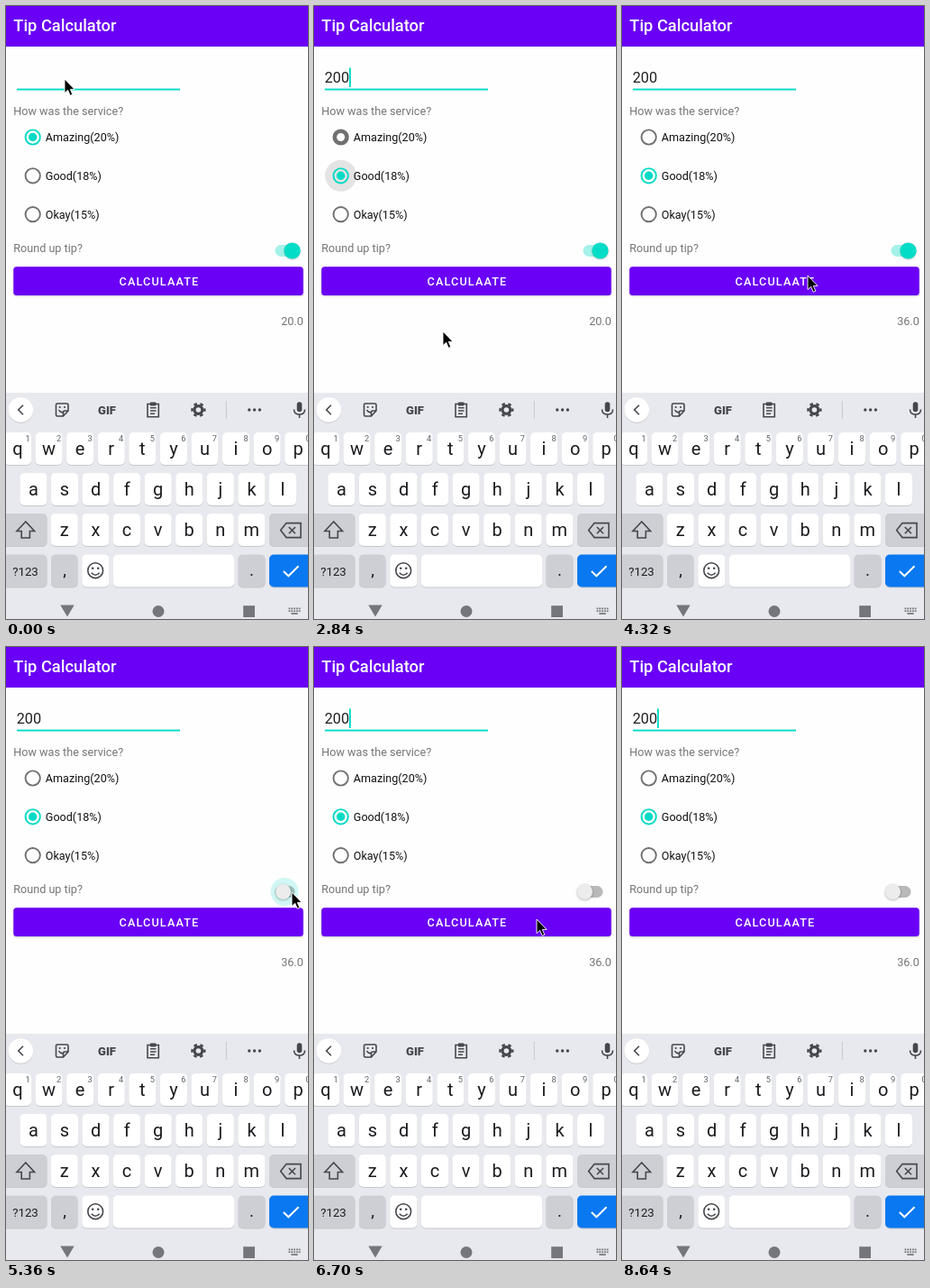
These frames come from a looping animation (335x680 px, 8.78 s). An HTML page:

```html
<!DOCTYPE html>
<html lang="en">
<head>
<meta charset="utf-8">
<title>Tip Calculator</title>
<style>
html, body { margin: 0; width: 100%; height: 100%; overflow: hidden; background: #fefefe; }
svg { display: block; font-family: Roboto, "Noto Sans", sans-serif; }
</style>
</head>
<body>
<svg id="stage" width="335" height="680" viewBox="0 0 335 680">
  <defs>
    <radialGradient id="glow" gradientUnits="userSpaceOnUse" cx="0" cy="0" r="150">
      <stop offset="0" stop-color="#fff" stop-opacity=".21"/>
      <stop offset=".6" stop-color="#fff" stop-opacity=".19"/>
      <stop offset="1" stop-color="#fff" stop-opacity="0"/>
    </radialGradient>
    <filter id="soft" x="-20%" y="-50%" width="140%" height="200%"><feGaussianBlur stdDeviation="1.3"/></filter>
  </defs>
  <rect width="335" height="680" fill="#fefefe"/>
  <rect width="335" height="45" fill="#6a00f6"/>
  <text x="8.3" y="27.6" font-size="18.3" font-weight="500" fill="#fff">Tip Calculator</text>

  <text id="amount" x="11.7" y="85.3" font-size="16.3" fill="#212121"></text>
  <rect x="12" y="91.6" width="181" height="1.9" fill="#03dac5"/>
  <rect id="caret" y="68.5" width="1.9" height="21.5" fill="#03dac5"/>

  <g font-size="12.65" fill="#757575">
    <text x="8.2" y="120.5">How was the service?</text>
    <text x="8.2" y="273">Round up tip?</text>
    <text id="result" x="329.8" y="354.3" text-anchor="end"></text>
  </g>
  <circle id="radioRipple" cx="29.7" cy="188.3" r="17.5"/>
  <g id="radios" font-size="12.6" fill="#111"></g>

  <rect id="track" x="298.5" y="265" width="22" height="13" rx="6.5"/>
  <circle id="halo" cy="271.5" r="15.5" fill="#03dac5"/>
  <circle id="thumbShadow" cy="272.3" r="9" fill="#000" opacity=".22" filter="url(#soft)"/>
  <circle id="thumb" cy="271.5" r="8.9"/>

  <rect id="buttonShadow" x="8.5" y="290.5" width="321" height="31" rx="3.5" fill="#000" filter="url(#soft)"/>
  <rect x="8.3" y="289.2" width="321.4" height="31.8" rx="3.5" fill="#6a00f6"/>
  <rect id="buttonRipple" x="8.3" y="289.2" width="321.4" height="31.8" rx="3.5" fill="url(#glow)"/>
  <text x="125.6" y="310" font-size="12.65" font-weight="500" letter-spacing="1.13" fill="#fff">CALCULAATE</text>

  <g id="keyboard"></g>
  <path id="pointer" d="M0 0V15.6L3.6 12.3L6.2 18.3L8.8 17.2L6.3 11.4H11Z" fill="#000" stroke="#fff" stroke-width=".9"/>
</svg>
<script>
const $ = id => document.getElementById(id);
const set = (id, attrs) => { for (const name in attrs) $(id).setAttribute(name, attrs[name]); };
const LOOP = 8780, STEPS = 59, STEP = LOOP / STEPS;
const TEAL = '#03dac5', GREY = '#707070';

// Pointer positions: [step, x, y]; each holds until the next.
const POINTER = [
  [0, 65, 81], [7, 118, 235], [8, 142, 322.5],
  [10, 122, 296], [11, 78, 230], [12, 52, 187], [13, 41, 186], [14, 33, 187], [15, 29, 188],
  [18, 78, 258], [19, 143, 361], [20, 151, 350], [21, 160, 331], [22, 167, 313], [23, 169, 307],
  [28, 176, 306], [29, 206, 299], [30, 252, 287], [31, 292, 277], [32, 314, 272], [33, 320, 271],
  [36, 317, 272], [37, 316, 273], [38, 300, 280], [39, 270, 295], [40, 247, 302],
  [47, 245, 299], [51, 248, 325], [52, 260, 392], [53, 278, 480], [54, 294, 572], [55, 306, 655], [56, 320, 720]
];

function drawRadios() {
  $('radios').innerHTML = ['Amazing(20%)', 'Good(18%)', 'Okay(15%)'].map((label, i) => {
    const y = 145.5 + i * 42.8;
    return `<circle id="ring${i}" cx="29.7" cy="${y}" fill="none"/>
      <circle id="dot${i}" cx="29.7" cy="${y}" fill="${TEAL}"/>
      <text x="43.8" y="${y + 4.7}">${label}</text>`;
  }).join('');
}

function drawKeyboard() {
  const key = (x, y, w, fill = '#fff') =>
    `<rect x="${x}" y="${y + 1}" width="${w}" height="36" rx="5" fill="#c6c8cc"/>
     <rect x="${x}" y="${y}" width="${w}" height="36" rx="5" fill="${fill}"/>`;
  const text = (s, x, y, size, extra = '') =>
    `<text x="${x}" y="${y}" font-size="${size}" text-anchor="middle" ${extra}>${s}</text>`;
  const row = (letters, x0, y) => [...letters].map((c, i) => {
    const x = x0 + i * 34.58;
    return key(x - 15, y, 30) + text(c, x, y + 24.6, 20);
  }).join('');
  const DARK = '#cdcfd4', INK = '#44474c';

  let s = '<rect y="429" width="335" height="251" fill="#e8e9ee"/><g fill="#1b1c1f">';
  s += row('qwertyuiop', 13, 473) + row('asdfghjkl', 30.4, 518) + row('zxcvbnm', 64.8, 563);
  for (let i = 0; i < 10; i++) s += text((i + 1) % 10, 24 + i * 34.58, 483, 9.3, `fill="#5f6368"`);
  s += key(-4, 563, 49.5, DARK) + key(292, 563, 48, DARK) + key(-4, 608.5, 49.5, DARK)
    + key(50, 608.5, 29.5, DARK) + key(84.3, 608.5, 30) + key(119, 608.5, 134)
    + key(257.5, 608.5, 30, DARK) + key(292, 608.5, 48, '#0a78f0');
  s += text('?123', 21.5, 631.5, 13.3) + text(',', 65, 632, 19) + text('.', 272.5, 632, 19) + '</g>';

  s += '<circle cx="16.3" cy="449" r="13.8" fill="#c9cbd0"/><circle cx="16.3" cy="448" r="13.8" fill="#fff"/>';
  s += text('GIF', 112, 452.5, 13, `font-weight="900" fill="${INK}"`);
  s += `<g fill="none" stroke="${INK}" stroke-width="1.6">
    <path d="M19 442.8L13.8 448L19 453.2"/>
    <path d="M57 441H67.5Q69 441 69 442.5V449L63.5 455H57Q55.5 455 55.5 453.5V442.5Q55.5 441 57 441ZM69 449H65Q63.5 449 63.5 451V455M58.5 448Q60 451 63 450.5"/>
    <path d="M157 441.5H169.3V455.8H157ZM160 449H166.5M160 452.3H165M160 445.8H166.5"/>
    <circle cx="213.4" cy="448" r="4.4" stroke-width="3.2"/>
    <circle cx="213.4" cy="448" r="6.9" stroke-width="2.4" stroke-dasharray="3.6 3.625" stroke-dashoffset="1.8"/>
    <path d="M244.3 438V458" stroke="#c4c6ca" stroke-width="1"/>
    <path d="M319.5 447.5Q319.5 453 325.5 453T331.5 447.5M325.5 453V457"/>
    <path d="M21.8 572L12 582.5H17.2V590H26.4V582.5H31.6Z"/>
    <path d="M311 573.6H327V589.6H311L304.6 581.6ZM313.8 578L321 585.2M321 578L313.8 585.2"/>
    <circle cx="99.2" cy="626.2" r="8.4"/>
    <path d="M94.8 628.8Q99.2 633.8 103.6 628.8"/>
    <path d="M307.8 627L313.3 632.3L324.5 621.3" stroke="#fff" stroke-width="1.9"/>
  </g><g fill="${INK}">
    <circle cx="59.7" cy="445" r="1.1"/><circle cx="65" cy="445" r="1.1"/>
    <rect x="159.8" y="439.5" width="6.7" height="4" rx="1"/>
    <circle cx="269.8" cy="448" r="1.7"/><circle cx="275.6" cy="448" r="1.7"/><circle cx="281.4" cy="448" r="1.7"/>
    <rect x="322.7" y="439.3" width="5.6" height="11" rx="2.8"/>
    <circle cx="96.2" cy="623.7" r="1.3"/><circle cx="102.2" cy="623.7" r="1.3"/>
  </g><g fill="#74767b">
    <path d="M60.3 664.5H75.7L68 677.5Z"/><circle cx="169" cy="671.5" r="6.5"/>
    <rect x="263.2" y="665.2" width="12.8" height="12.8"/>`;
  for (let i = 0; i < 10; i++) s += `<rect x="${313.5 + i % 5 * 2.8}" y="${667.5 + (i > 4) * 2.8}" width="1.8" height="1.8"/>`;
  s += '<rect x="316.3" y="673.2" width="7.4" height="1.7"/></g>';
  $('keyboard').innerHTML = s;
}

// A ring with a filled dot, or a thick ring while it is closing.
function radio(i, color, dot, width = 1.9) {
  set('ring' + i, { stroke: color, 'stroke-width': width, r: 9.1 - width / 2 });
  set('dot' + i, { r: dot, fill: color });
}

function render(time) {
  const k = Math.floor((time + 5) / STEP) % STEPS;

  const amount = k < 1 ? '' : k < 4 ? '2' : '200';
  const blinkOn = k < 4 ? k > 0 : Math.floor((k * STEP - 590) / 500) % 2 === 0;
  $('amount').textContent = amount;
  set('caret', { x: 11.5 + amount.length * 9.16, opacity: +blinkOn });
  $('result').textContent = k < 26 ? '20.0' : '36.0';

  if (k < 18) radio(0, TEAL, 4.7);
  else if (k === 18) radio(0, GREY, 4);
  else radio(0, GREY, 0, k === 19 ? 4.6 : 1.9);
  if (k < 18) radio(1, GREY, 0);
  else if (k === 18) radio(1, TEAL, 0, 4.6);
  else radio(1, TEAL, 4.7);
  radio(2, GREY, 0);
  const fade = { 17: .1, 18: .12, 19: .1, 20: .04 };
  set('radioRipple', { opacity: fade[k] || 0 });

  const on = k < 36;
  const thumbX = on ? 317.5 : k === 36 ? 307.5 : 300.5;
  set('track', { fill: on ? '#a4f2ea' : '#b9b9b9' });
  set('thumb', { cx: thumbX, fill: on ? '#03dcc6' : '#ececec', r: on ? 9.1 : 8.5 });
  set('thumbShadow', { cx: thumbX });
  set('halo', { cx: k === 36 ? 309 : thumbX, opacity: { 35: .18, 36: .18, 37: .07 }[k] || 0 });

  const glow = { 25: .6, 26: 1, 27: 1, 28: .4, 41: .6, 42: 1, 43: 1, 44: .4 }[k] || 0;
  const pressed = k === 25 || k === 41;
  set('glow', { cx: k < 35 ? 169 : 247, cy: 307, r: pressed ? 85 : 150 });
  set('buttonRipple', { opacity: glow });
  set('buttonShadow', { opacity: pressed ? .6 : .3 });

  const [, x, y] = POINTER.filter(p => p[0] <= k).pop();
  set('pointer', { transform: `translate(${x} ${y})` });
}

drawRadios();
drawKeyboard();
const start = performance.now();
function tick() {
  render((performance.now() - start) % LOOP);
  requestAnimationFrame(tick);
}
tick();
</script>
</body>
</html>
```
